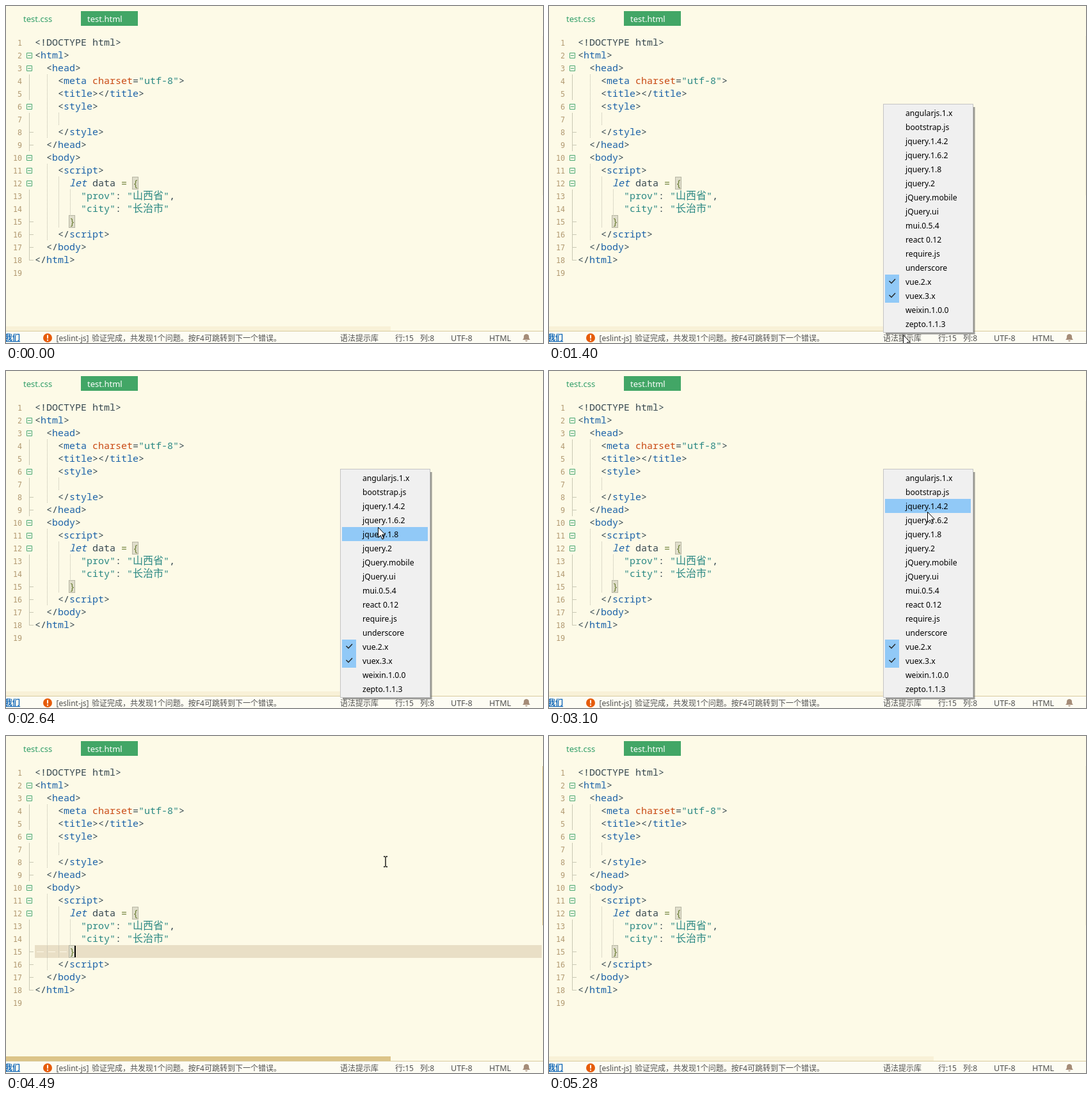
An HTML page for the animation above (5420 ms loop, 839 by 527 pixels).

```html
<!DOCTYPE html>
<html lang="zh-CN">
<head>
<meta charset="utf-8">
<title>Editor menu</title>
<style>
  html, body { margin: 0; width: 100%; height: 100%; overflow: hidden; background: #fdfae7; }
  svg { display: block; }
  text { font: 12px "Noto Sans", "Noto Sans CJK SC", "Noto Sans CJK", sans-serif; fill: #505050; }
  .tab { font-size: 13px; }
  .item { font-size: 12.2px; fill: #000; }
  .wide { font-size: 12.5px; }
  .code { font: 15px "Noto Sans Mono", "Noto Sans CJK SC", "Noto Sans CJK", monospace; fill: #36474f; }
  .num { font: 11.7px "DejaVu Sans Mono", monospace; fill: #b29a72; text-anchor: end; }
  .str { fill: #2a8883; }
  .han { font-size: 16px; font-weight: 300; }
  .name { fill: #1b62a8; }
  .let { fill: #1b62a8; font-style: italic; }
  .attr { fill: #c94a14; }
  .op { fill: #6c7f35; }
  .link { fill: #1268b8; font-weight: bold; text-decoration: underline; }
  .guide { stroke: #bdbbac; stroke-dasharray: 1 1; }
  .fold { stroke: #c9c8b4; fill: none; }
  .box { stroke: #4aa873; fill: none; }
  .brace { fill: #dfddca; stroke: #b7b6a4; }
</style>
</head>
<body>
<svg id="stage" width="839" height="527" viewBox="0 0 839 527"></svg>
<script>
const LOOP = 5420;
const stage = document.getElementById('stage');

function add(parent, tag, attrs = {}, content) {
  const el = document.createElementNS('http://www.w3.org/2000/svg', tag);
  for (const key in attrs) el.setAttribute(key, attrs[key]);
  if (content !== undefined) el.textContent = content;
  return parent.appendChild(el);
}
const rect = (parent, x, y, width, height, fill) => add(parent, 'rect', { x, y, width, height, fill });
const path = (parent, d, attrs) => add(parent, 'path', { d, ...attrs });
const label = (parent, x, y, content, cls = '') => add(parent, 'text', { x, y, class: cls }, content);
const group = (parent = stage) => add(parent, 'g');
const rowMid = n => 37 + 20 * n;

// Tabs
rect(stage, 117, 8, 89, 23, '#42a666');
label(stage, 27, 25, 'test.css', 'tab').style.fill = '#2f9d67';
label(stage, 127, 25, 'test.html', 'tab').style.fill = '#fff';

// Highlighted line
const activeLine = group();
rect(activeLine, 45, 327, 792, 20, '#e9dfc6');
path(activeLine, 'M48 337.5h11M66 337.5h11M84 337.5h11', { stroke: '#fdf8e6' });

// Indent guides and folding marks
const guides = [[64, 4, 8], [64, 11, 16], [82, 7, 7], [82, 12, 15], [100, 13, 14]];
for (const [x, from, to] of guides)
  path(stage, `M${x + .5} ${rowMid(from) - 10}V${rowMid(to) + 10}`, { class: 'guide' });
path(stage, 'M36.5 107V147M36.5 167V227M36.5 287V397.5', { class: 'fold' });
for (const n of [8, 9, 15, 16, 17, 18])
  path(stage, `M36 ${rowMid(n) + .5}h7`, { class: 'fold' });
for (const n of [2, 3, 6, 10, 11, 12])
  path(stage, `M32.5 ${rowMid(n) - 3.5}h8v8h-8zM34 ${rowMid(n) + .5}h5`, { class: 'box' });
for (const [x, n] of [[198, 12], [99, 15]])
  add(stage, 'rect', { x: x - .5, y: rowMid(n) - 9.5, width: 9, height: 19, class: 'brace' });

// Code
const lines = [
  [0, '<!DOCTYPE html>'], [0, '<html>'], [1, '<head>'], [2, '<meta charset="utf-8">'],
  [2, '<title></title>'], [2, '<style>'], [0, ''], [2, '</style>'], [1, '</head>'],
  [1, '<body>'], [2, '<script>'], [3, 'let data = {'], [4, '"prov": "山西省",'],
  [4, '"city": "长治市"'], [3, '}'], [2, '<\/script>'], [1, '</body>'], [0, '</html>'], [0, '']
];
const token = /("[\w-]*"|")|([\u4e00-\u9fff]+)|((?<=<\/?)\w+)|(let)|(charset)|( = |[{}])/g;
const tokenClasses = ['str', 'str han', 'name', 'let', 'attr', 'op'];
lines.forEach(([indent, source], i) => {
  const y = rowMid(i + 1) + 5;
  label(stage, 25, y, i + 1, 'num');
  const line = label(stage, 45 + 18 * indent, y, '', 'code');
  let end = 0;
  for (const match of source.matchAll(token)) {
    line.append(source.slice(end, match.index));
    const kind = match.slice(1).findIndex(Boolean);
    add(line, 'tspan', { class: tokenClasses[kind] }, match[0]);
    end = match.index + match[0].length;
  }
  line.append(source.slice(end));
});
const caret = rect(stage, 107, 328, 2, 18, '#000');

// Scrollbars
const scrollbars = group();
rect(scrollbars, 0, 501, 601, 7, '#dcc488');
rect(scrollbars, 838, 47, 1, 249, '#dcc488');

// Status bar
rect(stage, 0, 508, 839, 19, '#fdfcf3');
rect(stage, 0, 508, 839, 1, '#d8cb9e');
label(stage, -2, 523, '我们', 'link');
add(stage, 'circle', { cx: 65, cy: 519, r: 7, fill: '#e65c0b' });
path(stage, 'M65 514.5v5.5M65 521.5v2', { stroke: '#fff', 'stroke-width': 2 });
label(stage, 78.5, 524, '[eslint-js]');
label(stage, 134, 524, '验证完成，共发现1个问题。按F4可跳转到下一个错误。');
label(stage, 522, 524, '语法提示库');
label(stage, 608, 524, '行:15');
label(stage, 647, 524, '列:8');
label(stage, 695, 524, 'UTF-8', 'wide');
label(stage, 755, 524, 'HTML', 'wide');
path(stage, 'M807 522c2-2 2-3 2-5c0-3 2-4 4-4s4 1 4 4c0 2 0 3 2 5zM811 523h4q-2 3-4 0z', { fill: '#a58c78' });

// Menu with a soft shadow to the lower right
const menu = group();
for (let i = 1; i <= 3; i++)
  add(menu, 'rect', { x: 526, y: 158, width: 137 + i, height: 353 + i, fill: '#666', opacity: .35 });
add(menu, 'rect', { x: 522.5, y: 153.5, width: 140, height: 357, fill: '#f0f0f0', stroke: '#c4c4c4' });
const hover = rect(menu, 525, 156, 134, 22, '#91c9f7');
const items = ['angularjs.1.x', 'bootstrap.js', 'jquery.1.4.2', 'jquery.1.6.2', 'jquery.1.8',
  'jquery.2', 'jQuery.mobile', 'jQuery.ui', 'mui.0.5.4', 'react 0.12', 'require.js',
  'underscore', 'vue.2.x', 'vuex.3.x', 'weixin.1.0.0', 'zepto.1.1.3'];
items.forEach((name, i) => {
  const top = 156 + 22 * i;
  if (name.startsWith('vue')) {
    rect(menu, 525, top, 22, 22, '#91c9f7');
    path(menu, `M531.5 ${top + 10}l3.5 3.5l6-6.5`, { fill: 'none', stroke: '#222', 'stroke-width': 1.4 });
  }
  label(menu, 557, top + 16, name, 'item');
});

// Pointer shapes and the click halo
const pointer = group();
const halo = add(pointer, 'circle', { cx: .5, cy: 1, r: 11, fill: '#f5e500', opacity: .75 });
const arrow = path(pointer, 'M.5.5V16.5L4.2 13L7 19L9.2 18L6.5 12H11.5Z', { fill: '#fff', stroke: '#000' });
const beam = path(pointer, 'M-1 -7.5H1.5M2.5 -7.5H5M2 -7V8M-1 8.5H1.5M2.5 8.5H5', { stroke: '#000', 'stroke-width': 1.3 });

// Pointer moves: first change, last change, number of changes, x, y
const moves = [
  [160, 540, 6, 553, 514], [1780, 2010, 4, 568, 362], [2090, 2320, 4, 581, 255],
  [2390, 2390, 1, 581, 247], [2560, 2640, 2, 581, 244], [2870, 3100, 4, 591, 220],
  [3650, 3710, 2, 591, 197], [3940, 3940, 1, 591, 196], [4720, 5190, 7, 602, 540]
];

// Progress from 0 to 1 in equal jumps, the first at `from`, the last at `to`
function steps(t, from, to, count) {
  if (t < from) return 0;
  if (t >= to) return 1;
  return (Math.floor((t - from) / (to - from) * (count - 1) + .1) + 1) / count;
}

function pointerAt(t) {
  let x = 624, y = 528;
  for (const [from, to, count, nextX, nextY] of moves) {
    const p = 1 - (1 - steps(t, from, to, count)) ** 1.28;
    x += (nextX - x) * p;
    y += (nextY - y) * p;
  }
  return [Math.round(x), Math.round(y)];
}

const within = (t, from, to) => t >= from && t < to;
const show = (el, visible) => el.setAttribute('visibility', visible ? 'inherit' : 'hidden');

function render(t) {
  const [x, y] = pointerAt(t);
  pointer.setAttribute('transform', `translate(${x} ${y})`);
  const menuOpen = within(t, 1240, 4330);
  const overText = t >= 4330 && y < 501;
  show(beam, overText);
  show(arrow, !overText);
  show(halo, within(t, 1090, 1240) || within(t, 4170, 4330));

  const focused = within(t, 1090, 1240) || within(t, 4330, 5280);
  show(activeLine, focused);
  show(caret, focused);

  show(menu, menuOpen);
  menu.setAttribute('opacity', steps(t, 1240, 1400, 3));
  const row = Math.floor((y - 156) / 22);
  show(hover, menuOpen && row >= 0 && row < items.length);
  hover.setAttribute('y', 156 + 22 * row);

  const shown = steps(t, 4330, 4490, 3) - steps(t, 4720, 5190, 7);
  scrollbars.setAttribute('opacity', .17 + .83 * shown);
}

function tick() {
  render(performance.now() % LOOP);
  requestAnimationFrame(tick);
}
tick();
</script>
</body>
</html>
```
